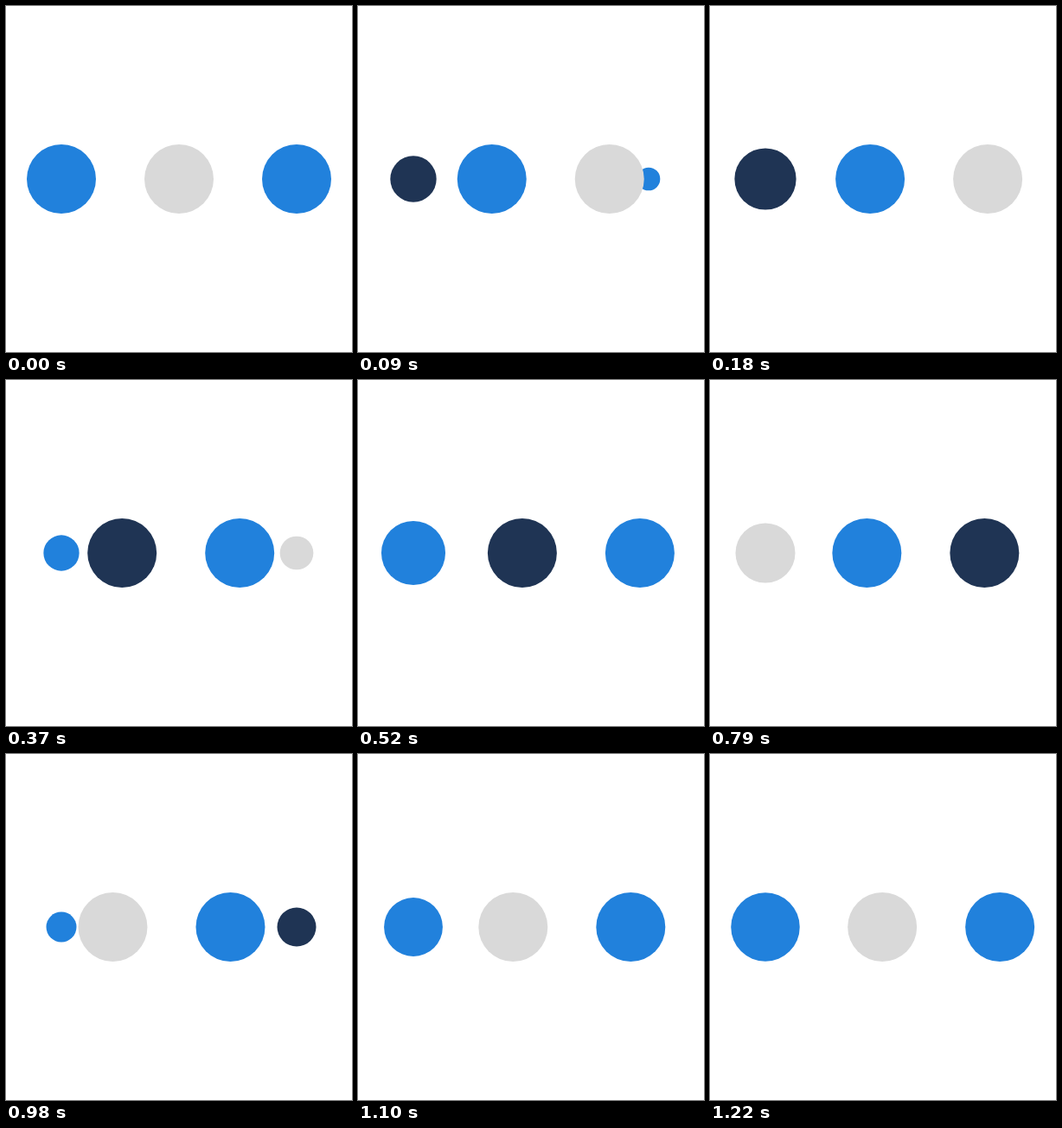
An HTML page with a canvas for the animation above (1.25 s loop, 400 px wide and 400 px high).

```html
<!DOCTYPE html>
<html lang="en">
<head>
<meta charset="utf-8">
<title>Passing dots</title>
<style>
  html, body { margin: 0; width: 100%; height: 100%; overflow: hidden; background: #fff; }
  canvas { display: block; }
</style>
</head>
<body>
<canvas id="stage" width="400" height="400"></canvas>
<script>
const ctx = document.getElementById('stage').getContext('2d');

const LOOP = 1250;
const FRAMES = 41;
const PHASES = 4;
const RADIUS = 40;
const LEFT = 64;
const GAP = 136;
const RIGHT = LEFT + 2 * GAP;
const BLUE = '#2181dc';
const NAVY = '#1f3454';
const GRAY = '#d9d9d9';

// Bottom to top; dot i grows in phase (PHASES + 1 - i) % PHASES.
const DOTS = [BLUE, NAVY, BLUE, GRAY];

// cubic-bezier(0, 0.5, 0.5, 1)
function ease(x) {
  let low = 0, high = 1;
  for (let i = 0; i < 30; i++) {
    const s = (low + high) / 2;
    if (1.5 * s * s - 0.5 * s ** 3 < x) low = s; else high = s;
  }
  return 1.5 * low - 0.5 * low ** 3;
}

// The motion advances in even steps whose starts are rounded to 10 ms.
function stepTime(ms) {
  const tick = Math.floor((ms % LOOP) / 10 + 0.01);
  const step = Math.ceil((tick + 0.5) * 10 * FRAMES / LOOP) - 1;
  return (step % FRAMES) / FRAMES;
}

function disc(x, radius, color) {
  if (radius <= 0) return;
  ctx.fillStyle = color;
  ctx.beginPath();
  ctx.arc(x, 200, radius, 0, 2 * Math.PI);
  ctx.fill();
}

function draw(ms) {
  const position = stepTime(ms) * PHASES;
  const phase = Math.floor(position);
  const e = ease(position - phase);
  const stageOf = i => (phase + i + PHASES - 1) % PHASES;

  ctx.fillStyle = '#fff';
  ctx.fillRect(0, 0, 400, 400);

  // The leaving dot shrinks beneath all others.
  DOTS.forEach((color, i) => {
    if (stageOf(i) === 3) disc(RIGHT, RADIUS * (1 - e), color);
  });
  DOTS.forEach((color, i) => {
    const stage = stageOf(i);
    if (stage === 0) disc(LEFT, RADIUS * e, color);
    else if (stage < 3) disc(LEFT + GAP * (stage - 1 + e), RADIUS, color);
  });
}

const start = performance.now();
function tick() {
  draw(performance.now() - start);
  requestAnimationFrame(tick);
}
tick();
</script>
</body>
</html>
```
